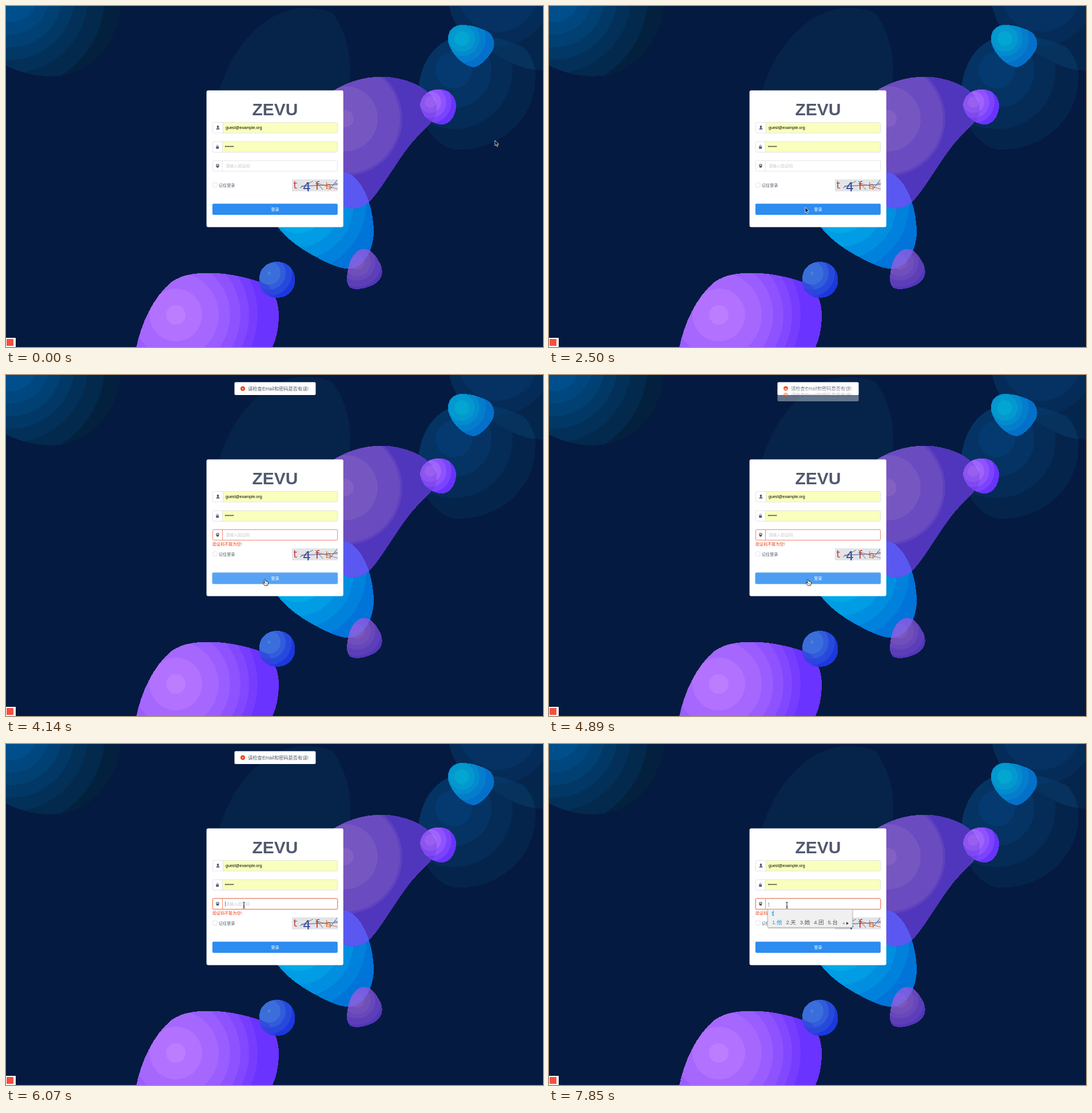
Recreate the animation shown at these times as an HTML page with a canvas. Size 939x596 px, loop 8 s.

```html
<!DOCTYPE html>
<html lang="zh">
<head>
<meta charset="utf-8">
<title>登录</title>
<style>
html, body { margin: 0; width: 100%; height: 100%; overflow: hidden; background: #051a40; }
canvas { display: block; }
</style>
</head>
<body>
<canvas id="stage" width="939" height="596"></canvas>
<script>
const W = 939, H = 596, LOOP = 8000, STEP = 148;
const FONT = '"Liberation Sans", "Noto Sans CJK SC", "Noto Sans CJK", sans-serif';
const CAPTCHA_FONT = '"DejaVu Sans", sans-serif';
const stage = document.getElementById('stage').getContext('2d');
let ctx = stage;

// ---------- helpers ----------
const mix = (a, b, u) => '#' + [1, 3, 5].map(i => {
  const p = parseInt(a.substr(i, 2), 16), q = parseInt(b.substr(i, 2), 16);
  return Math.round(p + (q - p) * u).toString(16).padStart(2, '0');
}).join('');

function box(x, y, w, h, r, fill, stroke, width = 1) {
  ctx.beginPath();
  ctx.roundRect(x, y, w, h, r);
  if (fill) { ctx.fillStyle = fill; ctx.fill(); }
  if (stroke) { ctx.strokeStyle = stroke; ctx.lineWidth = width; ctx.stroke(); }
}

function disc(x, y, r, fill) {
  ctx.beginPath();
  ctx.arc(x, y, r, 0, 7);
  ctx.fillStyle = fill;
  ctx.fill();
}

function text(str, x, y, size, color, align = 'left', weight = '', font = FONT) {
  ctx.font = `${weight} ${size}px ${font}`;
  ctx.textAlign = align;
  ctx.fillStyle = color;
  ctx.fillText(str, x, y);
}

function path(d, fill, stroke, width = 1) {
  const p = new Path2D(d);
  if (fill) { ctx.fillStyle = fill; ctx.fill(p); }
  if (stroke) { ctx.strokeStyle = stroke; ctx.lineWidth = width; ctx.stroke(p); }
}

// A blob filled with concentric bands, from the outer colour to the inner one.
function blob(d, cx, cy, radii, inner, outer, alpha = 1) {
  const layer = new OffscreenCanvas(W, H), keep = ctx;
  ctx = layer.getContext('2d');
  ctx.clip(new Path2D(d));
  ctx.fillStyle = outer;
  ctx.fillRect(0, 0, W, H);
  radii.forEach((r, i) => disc(cx, cy, r, mix(outer, inner, (i + 1) / radii.length)));
  ctx = keep;
  ctx.globalAlpha = alpha;
  ctx.drawImage(layer, 0, 0);
  ctx.globalAlpha = 1;
}

// Fills the part that two shapes share.
function overlap(a, b, fill) {
  ctx.save();
  ctx.clip(new Path2D(a));
  path(b, fill);
  ctx.restore();
}

// ---------- static scenery ----------
const VIOLET = 'M560 157C588 134 625 123.5 657 123.5C697 124 735 140 750 165Q757 182 748 198C738 211 722 224 709 240C684 270 659 317 636 342Q622 354 605 354Q585 353 570 330Z';
const AZURE = 'M455 350C466 385 497 413 530 432C555 446 580 459.5 601 459.5C626 458 643 425 643 396C643 360 631 317 606 296Q597 290 580 289Z';
const BERRY = 'M596 476C597 450 608 424.5 627 424.5C642 426 648 440 655 451C661 467 657 479 643 487C628 494.5 613 497 603 493Q596 488 596 476Z';
const PLUM = 'M228 596C236 557 257 508 290 482C310 468 335 466.5 357 466.5C396 467 430 477 457 487Q478 510 477 545Q476 575 466 596Z';
const MARBLE = 'M442.5 479C442.5 460 455 447 474 447S505.5 461 505.5 479S492 510 474 510S442.5 497 442.5 479Z';
const LILAC = 'M724 173C726 155 740 145.5 758 145.5C777 146 788 160 787 177C785 195 775 207 761 207.5C742 205 726 192 724 173Z';
const HALO = 'M721 152C721 105 750 52 806 52C830 50 870 55 906 73Q926 95 926 125C926 180 890 225 840 243Q805 254 780 250C745 240 721 200 721 152Z';
const CORNER = 'M775 0C781 32 802 61 835 73C860 83 890 112 939 113V0Z';

function drawBackground() {
  ctx.fillStyle = '#051a40';
  ctx.fillRect(0, 0, W, H);
  blob('M0 104Q38 123 78 123C130 123 168 90 187 50Q200 25 200 0H0Z', 8, -18,
    [165, 136, 112, 90, 68, 46], '#004f8c', '#03213f');
  path('M372 150C395 70 455 3 525 3Q553 4 571 12Q602 55 602 112L600 160Z', '#06234a');
  blob(HALO, 783, 112, [103, 66, 32], '#053a70', '#05244b');
  blob(CORNER, 860, -25, [95, 70], '#05376a', '#06294f', 0.85);
  overlap(HALO, CORNER, 'rgba(8,62,112,.45)');
  blob(AZURE, 510, 345, [120, 98, 76, 52], '#00a9e8', '#0074d8');
  blob(VIOLET, 593, 197, [100, 96, 57, 15], '#8360c3', '#5036bc');
  overlap(AZURE, VIOLET, '#5a58f1');
  blob('M773 62C771 42 783 33 798 33C815 33 824 37 837 42C853 48 856 64 852 75C844 92 827 107 817 107C800 105 777 83 773 62Z',
    797, 57, [42, 31, 23, 13], '#02a6d1', '#0470ca');
  blob(LILAC, 742, 168, [37, 28, 19, 10], '#b373ff', '#6833fb');
  overlap(VIOLET, LILAC, 'rgba(92,52,205,.3)');
  blob(PLUM, 297, 540, [143, 128, 113, 95, 75, 46, 17], '#be7cff', '#6a33ff');
  blob(MARBLE, 460, 467, [40, 29, 20, 3], '#4580da', '#1c37dc');
  overlap(PLUM, MARBLE, 'rgba(55,60,225,.55)');
  blob(BERRY, 614, 448, [43, 32, 24, 13], '#7b57ba', '#5236b8');
  overlap(AZURE, BERRY, 'rgba(125,108,255,.55)');
  box(0, 580, 17, 16, 0, '#fff');
  box(1, 582, 12, 12, 0, '#f4503f');
}

function drawCaptcha() {
  const glyph = (char, x, y, size, color) => text(char, x, y, size, color, 'left', '', CAPTCHA_FONT);
  ctx.save();
  ctx.beginPath();
  ctx.rect(500, 303, 80, 21);
  ctx.clip();
  ctx.fillStyle = '#e2e5e8';
  ctx.fill();
  glyph('t', 502.5, 319, 17, '#c93a30');
  glyph('4', 519, 324, 22, '#35479a');
  glyph('f', 541, 321, 19, '#c9352f');
  glyph('b', 558.5, 320, 16, '#e28432');
  path('M514 318L537 306M541 306L554 321', null, '#4b5a4a', 0.8);
  path('M516 315L580 312', null, '#3a4698', 0.9);
  path('M548 311L580 320', null, '#d0463f', 0.8);
  path('M566 321L579 304M574 310H580', null, '#34507c', 0.8);
  ctx.restore();
}

function drawCard() {
  box(350.6, 147.5, 239.2, 239, 3, '#fff');
  text('ZEVU', 470.5, 191, 30, '#515a6e', 'center', 'bold');
  for (const [y, divider, fill] of [[203.5, 379.5, '#faffbd'], [237, 378.5, '#faffbd'], [270.2, 378.5, '#fff']]) {
    box(361.5, y, 218, 18.5, 2, '#fff');
    box(divider, y, 580 - divider, 18.5, [0, 2, 2, 0], fill);
    box(361.5, y, 218, 18.5, 2, null, '#dcdee2', 0.8);
    path(`M${divider} ${y}v18.5`, null, '#dcdee2', 0.8);
  }
  text('guest@example.org', 384, 215, 7.1, '#000');
  for (let i = 0; i < 6; i++) disc(384 + i * 2.6, 245.5, 0.95, '#111');
  disc(370.5, 211, 1.9, '#515a6e');
  path('M369.7 212h1.6v1.5l2.2 1v1.2h-6v-1.2l2.2-1Z', '#515a6e');
  box(367.2, 245.4, 5, 4, 0.6, '#515a6e');
  path('M368.3 245.5v-1a1.4 1.4 0 0 1 2.8 0v1', null, '#515a6e', 0.8);
  box(367.4, 276.2, 5.2, 5, 1.3, '#515a6e');
  box(368.4, 277.6, 3.2, 1.4, 0.3, '#fff');
  path('M368 281h4l-.6 1.6h-2.8Z', '#515a6e');
  box(361.5, 309, 7.5, 7.5, 1, '#fff', '#dcdee2', 0.8);
  text('记住登录', 372, 315.6, 7.1, '#515a6e');
  drawCaptcha();
}

const scenery = new OffscreenCanvas(W, H);
ctx = scenery.getContext('2d');
drawBackground();
drawCard();
ctx = stage;

// ---------- moving parts ----------
// Pointer keys: step, x, y, power of the ease-out leading there.
const POINTER = [[1, 855, 235, 1], [9, 588, 291, 1], [10, 548, 296, 1], [17, 448, 352, 2.2],
  [21, 448, 352, 1], [22, 453, 357, 1], [33, 453, 357, 1], [39, 416, 282, 1.8]];

function pointerAt(k) {
  const i = POINTER.findIndex(key => key[0] >= k);
  if (i < 0) return POINTER[POINTER.length - 1].slice(1, 3);
  if (i === 0) return POINTER[0].slice(1, 3);
  const [k0, x0, y0] = POINTER[i - 1], [k1, x1, y1, power] = POINTER[i];
  const u = 1 - (1 - (k - k0) / (k1 - k0)) ** power;
  return [x0 + (x1 - x0) * u, y0 + (y1 - y0) * u];
}

function drawPointer(x, y, k) {
  ctx.save();
  ctx.translate(x, y);
  ctx.lineJoin = 'round';
  if (k >= 22 && y > 346) {
    path('M-1.6 .8Q-.6-.6.4.8L1.5 4Q2.4 3.2 3 4.2Q4 3.6 4.4 4.8Q5.3 4.5 5.5 5.6V8L4.4 11H-.6L-3.6 7.2Q-4 5.8-2.7 6L-.6 7.2Z',
      '#fff', '#111', 0.9);
    path('M1.3 7v2M3 7v2', null, '#111', 0.5);
  } else if (y < 289 && k > 33) {
    path('M-1.8-5.5Q0-5.5 0-4.5V4Q0 5-1.8 5M1.8-5.5Q0-5.5 0-4.5M0 4Q0 5 1.8 5M-1.2 1.8H1.2', null, '#111', 0.9);
  } else {
    path('M0 0V9.2L2.1 7.3L3.6 10.7L5.1 10L3.6 6.7H6.6Z', '#000', '#fff', 0.8);
  }
  ctx.restore();
}

function drawToast(y, alpha) {
  ctx.save();
  ctx.globalAlpha = alpha;
  ctx.translate(0, y);
  box(399.5, 0.5, 142, 22.5, 2, '#fff');
  disc(414, 11.8, 4, '#ed4014');
  path('M412.6 10.4l2.8 2.8m0-2.8l-2.8 2.8', null, '#fff', 0.8);
  text('请检查Email和密码是否有误!', 423, 14.8, 8.3, '#515a6e');
  ctx.restore();
}

function drawToasts(k) {
  if (k >= 27 && k < 38) {
    if (k === 27) drawToast(-8, 0.4);
    else if (k === 37) drawToast(2, 0.6);
    else drawToast(12, 1);
  }
  if (k >= 33 && k < 44) {
    if (k === 33) drawToast(23, 0.38);
    else if (k < 38) drawToast(45, 1);
    else if (k === 43) drawToast(1, 0.6);
    else drawToast(12, 1);
  }
}

function drawButton(k, pointerY) {
  const hovered = k >= 22 && pointerY > 346;
  const amount = !hovered ? 0 : k === 22 ? 0.5 : k === 32 || k === 33 ? 0.75 : 1;
  if (k >= 26 && k < 40) box(360.4, 345.2, 219.8, 20.2, 3, null, 'rgba(45,140,240,.3)', 1.3);
  box(360.9, 345.6, 219, 19.4, 2, mix('#2d8cf0', '#57a3f3', amount));
  text('登录', 470.5, 358.2, 7.1, '#fff', 'center');
}

function drawCodeField(k) {
  const typed = k >= 50;
  if (k >= 26) {
    if (k >= 40) box(360.5, 269.3, 220, 20.3, 3, null, 'rgba(237,64,20,.25)', 1.2);
    box(361.5, 270.2, 218, 18.5, 2, null, '#f2704f', 0.8);
    path('M378.5 270.2v18.5', null, '#f2704f', 0.8);
    text('验证码不能为空!', 361, 298.3, 7.1, '#ed4014');
  }
  if (typed) {
    text('t', 383.3, 282, 7.1, '#515a6e');
    path('M383 284h2.5', null, '#515a6e', 0.6);
  } else {
    text('请输入验证码', 384, 282, 7.1, '#c5c8ce');
  }
  const caretShown = k >= 40 && k < 44 || k >= 47 && k < 53;
  if (caretShown) path(`M${typed ? 385.5 : 383.5} 275v9`, null, '#515a6e', 0.8);
}

function drawCandidates() {
  ctx.save();
  ctx.shadowColor = 'rgba(0,0,0,.4)';
  ctx.shadowBlur = 3;
  ctx.shadowOffsetY = 1;
  box(382.5, 289, 148, 31.5, 1.5, '#f0f0f0');
  ctx.restore();
  box(382.5, 289, 148, 31.5, 1.5, null, '#b9b9b9', 0.7);
  text('t', 389.5, 299.5, 10, '#1a9bd8');
  path('M392.5 291v10', null, '#1a9bd8', 0.8);
  [...'他天她团台'].forEach((word, i) =>
    text(`${i + 1}.${word}`, 390 + i * 24.4, 315, 9.5, i ? '#555' : '#1a9bd8'));
  path('M516.5 311.5v4l-3.5-2Z', '#999');
  path('M520 311v5l4-2.5Z', '#333');
}

function draw(now) {
  const k = Math.floor((now % LOOP + 16) / STEP);
  const [x, y] = pointerAt(k);
  ctx.drawImage(scenery, 0, 0);
  drawCodeField(k);
  drawButton(k, y);
  drawToasts(k);
  if (k >= 51) drawCandidates();
  drawPointer(x, y, k);
}

const start = performance.now();
function tick() {
  draw(performance.now() - start);
  requestAnimationFrame(tick);
}
tick();
</script>
</body>
</html>
```
